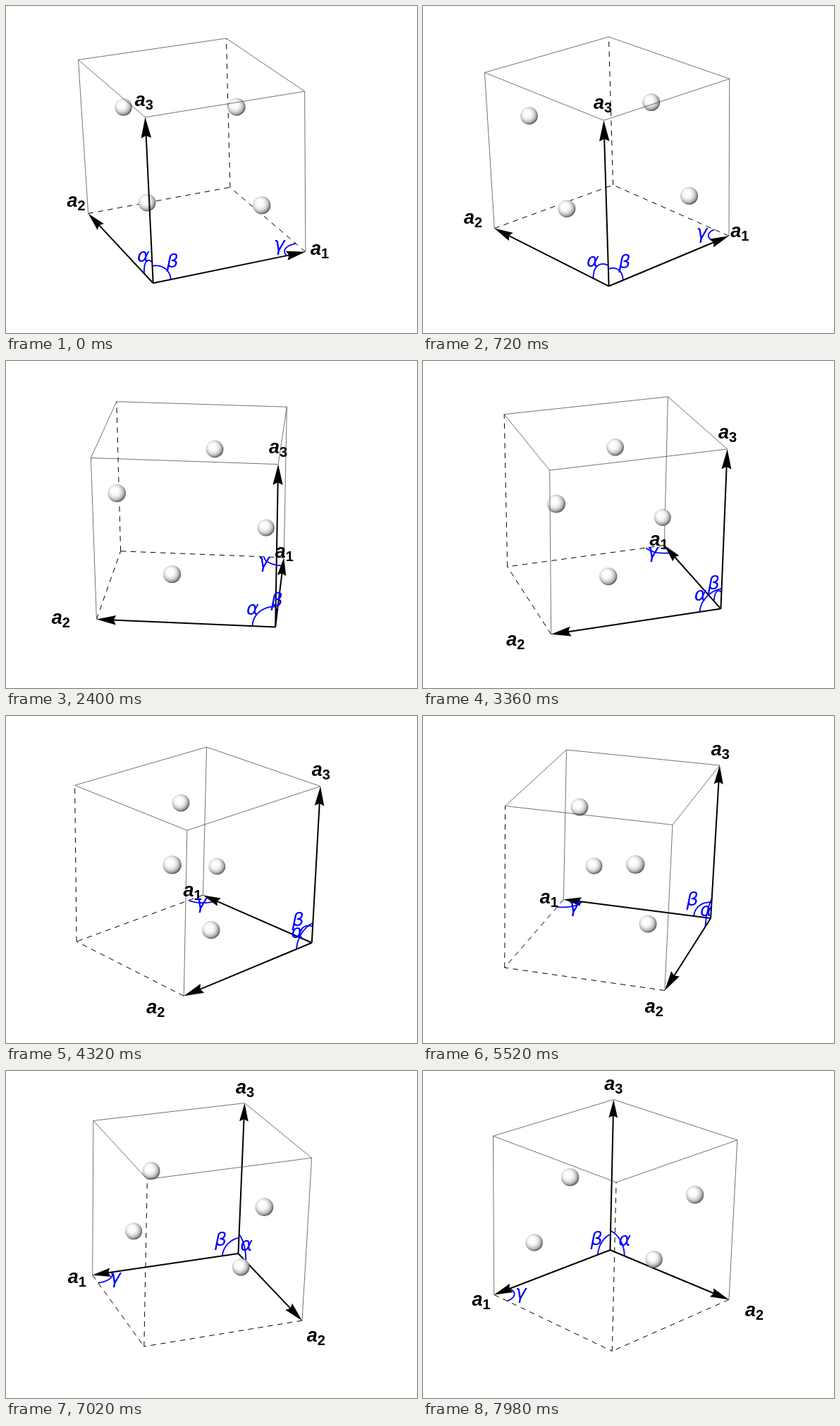
Write an HTML page with a canvas that moves like this. It is 583x464 px and loops after 8000 ms.

```html
<!DOCTYPE html>
<html lang="en">
<head>
<meta charset="utf-8">
<title>Rotating unit cell</title>
<style>
html, body { margin: 0; width: 100%; height: 100%; overflow: hidden; background: #fff; }
canvas { display: block; }
</style>
</head>
<body>
<canvas id="stage" width="583" height="464"></canvas>
<script>
const ctx = document.getElementById('stage').getContext('2d');
const LOOP = 8000, STEP = 60, DEG = Math.PI / 180;

// Monoclinic cell: edge lengths, and how far the third axis leans along the first
const cell = { a: 228.4, b: 243.4, h: 237.5, lean: -7.8 };
const cam = { x: 281, y: 210.9, dist: 2280, sin: 0.3836, cos: 0.9235, axis: -14.2, drop: 110 };
const atoms = [[0.762, 0.401, 0.8], [0.238, 0.901, 0.7], [0.238, 0.599, 0.2], [0.762, 0.099, 0.3]];
const BLUE = '#00f';
let turnCos = 1, turnSin = 0;

// Fractional cell coordinates to screen position, with depth scale s
function project([a, b, c]) {
  const p = (a - 0.5) * cell.a + cell.lean * c;
  const q = (b - 0.5) * cell.b;
  const z = c * cell.h;
  const x = p * turnCos - q * turnSin;
  const y = p * turnSin + q * turnCos;
  const s = cam.dist / (cam.dist + y * cam.cos - z * cam.sin);
  const up = z * cam.cos + y * cam.sin - cam.drop;
  return { x: cam.x + (x + cam.axis) * s, y: cam.y - up * s, s };
}

function cross(o, u, v) {
  const p = project(o), q = project(u), r = project(v);
  return (q.x - p.x) * (r.y - p.y) - (q.y - p.y) * (r.x - p.x);
}

function facing() {
  return {
    i: [cross([0, 0, 0], [0, 1, 0], [0, 0, 1]) > 0, cross([1, 0, 0], [1, 1, 0], [1, 0, 1]) < 0],
    j: [cross([0, 0, 0], [1, 0, 0], [0, 0, 1]) < 0, cross([0, 1, 0], [1, 1, 0], [0, 1, 1]) > 0]
  };
}

function line(from, to, dashed) {
  const p = project(from), q = project(to);
  ctx.strokeStyle = dashed ? '#000' : '#444';
  ctx.lineWidth = dashed ? 1 : 0.75;
  ctx.setLineDash(dashed ? [7.5, 6.5] : []);
  ctx.beginPath();
  ctx.moveTo(p.x, p.y);
  ctx.lineTo(q.x, q.y);
  ctx.stroke();
  ctx.setLineDash([]);
}

function arrow(to) {
  const p = project([0, 0, 0]), q = project(to);
  const len = Math.hypot(q.x - p.x, q.y - p.y), head = 26.5 * q.s;
  ctx.save();
  ctx.translate(q.x, q.y);
  ctx.rotate(Math.atan2(q.y - p.y, q.x - p.x));
  ctx.strokeStyle = ctx.fillStyle = '#000';
  ctx.lineWidth = 2;
  ctx.beginPath();
  ctx.moveTo(-len, 0);
  ctx.lineTo(-head * 0.8, 0);
  ctx.stroke();
  ctx.beginPath();
  ctx.moveTo(0, 0);
  ctx.lineTo(-head, -head * 0.245);
  ctx.lineTo(-head * 0.88, 0);
  ctx.lineTo(-head, head * 0.245);
  ctx.fill();
  ctx.restore();
}

// Quarter arc in the plane of two edge directions, radius in world units
function arc(corner, u, v, radius) {
  const size = [cell.a, cell.b, cell.h];
  ctx.strokeStyle = BLUE;
  ctx.lineWidth = 1.8;
  ctx.beginPath();
  for (let n = 0; n <= 24; n++) {
    const t = n / 24 * Math.PI / 2;
    const p = project(corner.map((c, k) =>
      c + radius / size[k] * (u[k] * Math.cos(t) + v[k] * Math.sin(t))));
    ctx.lineTo(p.x, p.y);
  }
  ctx.stroke();
}

function sphere(p) {
  const r = 12.2 * p.s;
  const g = ctx.createRadialGradient(p.x - r * 0.28, p.y - r * 0.3, 0, p.x - r * 0.12, p.y - r * 0.13, r * 1.16);
  g.addColorStop(0, '#fff');
  g.addColorStop(0.38, '#fafafa');
  g.addColorStop(0.62, '#dcdcdc');
  g.addColorStop(0.82, '#a8a8a8');
  g.addColorStop(1, '#505050');
  ctx.fillStyle = g;
  ctx.beginPath();
  ctx.arc(p.x, p.y, r, 0, 2 * Math.PI);
  ctx.fill();
}

function axisLabel(at, digit) {
  const p = project(at);
  ctx.fillStyle = '#000';
  ctx.textAlign = 'left';
  ctx.font = 'italic bold 27px "Liberation Sans", sans-serif';
  ctx.fillText('a', p.x - 13.5, p.y + 8.5);
  ctx.font = 'bold 20px "Liberation Sans", sans-serif';
  ctx.fillText(digit, p.x + 1.5, p.y + 13.5);
}

function angleLabel(at, letter, dy) {
  const p = project(at);
  ctx.fillStyle = BLUE;
  ctx.textAlign = 'center';
  ctx.font = 'italic 27px "DejaVu Sans", sans-serif';
  ctx.fillText(letter, p.x, p.y + dy);
}

// Draws the parts lying behind (front = false) or before (front = true) the atoms
function frame(front, face) {
  const { i, j } = face;
  if (front) {
    line([0, 0, 1], [1, 0, 1]);
    line([1, 0, 1], [1, 1, 1]);
    line([1, 1, 1], [0, 1, 1]);
    line([0, 1, 1], [0, 0, 1]);
  } else {
    arc([1, 0, 0], [-1, 0, 0], [0, 1, 0], 29);
  }
  if ((i[1] || j[0]) === front) line([1, 0, 0], [1, 0, 1]);
  if ((i[0] || j[1]) === front) line([0, 1, 0], [0, 1, 1]);
  if ((i[1] || j[1]) === front) line([1, 1, 0], [1, 1, 1], true);
  if (i[1] === front) line([1, 0, 0], [1, 1, 0], true);
  if (j[1] === front) line([0, 1, 0], [1, 1, 0], true);
  if (i[0] === front) arc([0, 0, 0], [0, 1, 0], [0, 0, 1], 31);
  if (j[0] === front) arc([0, 0, 0], [1, 0, 0], [0, 0, 1], 25.5);
  if (j[0] === front) arrow([1, 0, 0]);
  if (i[0] === front) arrow([0, 1, 0]);
  if ((i[0] || j[0]) === front) arrow([0, 0, 1]);
}

function draw(ms) {
  const angle = (24.5 + 1.5 * Math.floor(ms / STEP)) * DEG;
  turnCos = Math.cos(angle);
  turnSin = Math.sin(angle);
  ctx.fillStyle = '#fff';
  ctx.fillRect(0, 0, 583, 464);

  const face = facing();
  frame(false, face);
  atoms.map(project).sort((p, q) => p.s - q.s).forEach(sphere);
  frame(true, face);

  axisLabel([1.1, 0, 0], '1');
  axisLabel([0, 1.2, 0], '2');
  axisLabel([0, 0, 1.1], '3');
  angleLabel([0, 0.127, 0.107], 'α', 7.4);
  angleLabel([0.127, 0, 0.106], 'β', 7.5);
  angleLabel([0.885, 0.115, 0], 'γ', 4.6);
}

const start = performance.now();
function tick() {
  draw((performance.now() - start) % LOOP);
  requestAnimationFrame(tick);
}
tick();
</script>
</body>
</html>
```
